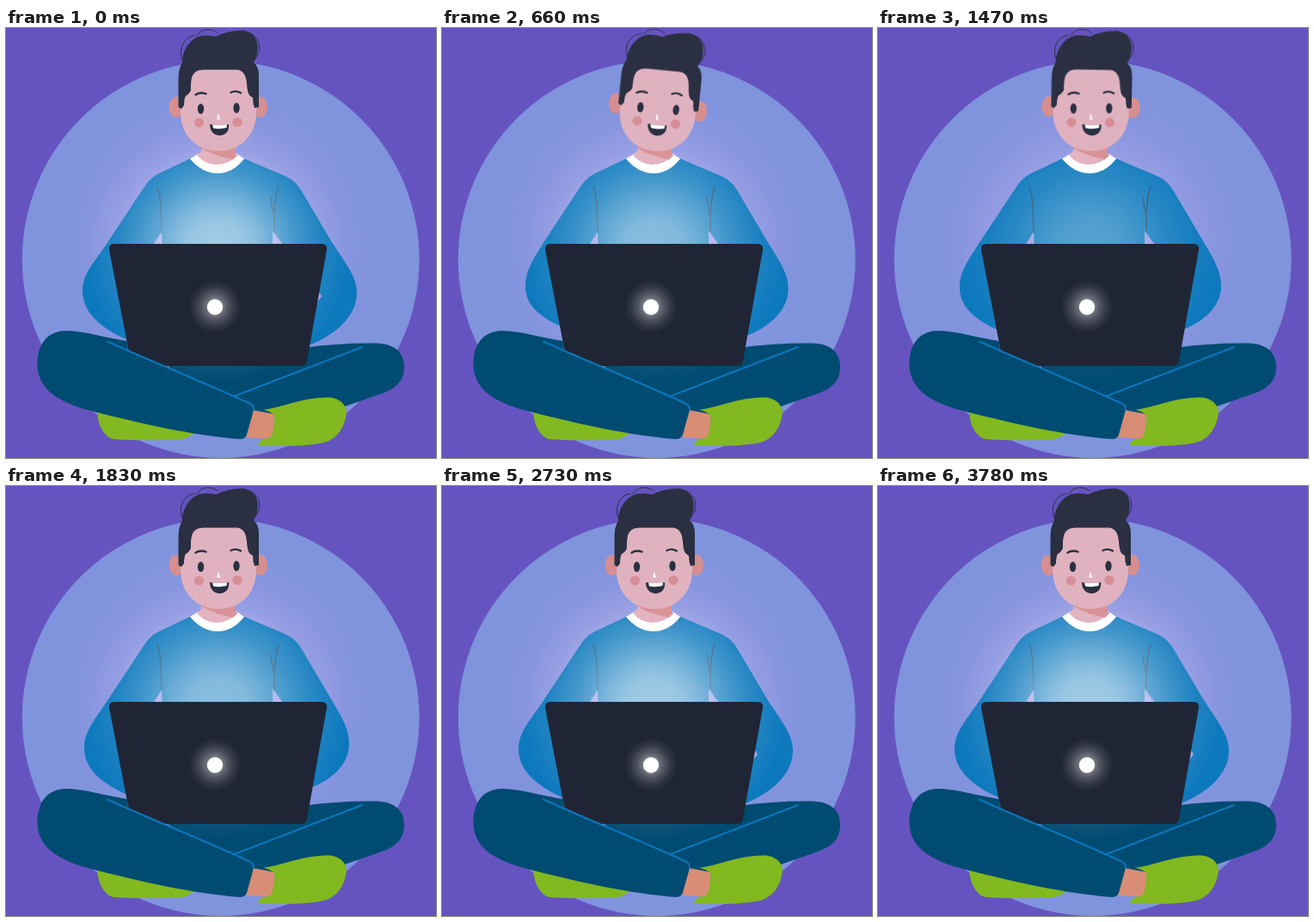
These frames come from a looping animation (500x500 px, 3.84 s). An HTML page:

```html
<!DOCTYPE html>
<html lang="en">
<head>
<meta charset="utf-8">
<title>Working on a laptop</title>
<style>
  html, body { margin: 0; width: 100%; height: 100%; overflow: hidden; background: #6554c0; }
  svg { display: block; width: 100vw; height: 100vh; }

  .anim { animation: 3840ms cubic-bezier(.37, 0, .63, 1) infinite; }
  .head { transform-origin: 247px 136px; animation-name: tilt; }
  .arm-l { animation-name: arm-l; }
  .arm-r { animation-name: arm-r; }
  .gap { animation-name: gap; }
  .glow { animation-name: dim; }

  @keyframes tilt {
    0%, 44.3%, 100% { transform: rotate(0deg); }
    22.1% { transform: rotate(6.4deg); }
  }
  @keyframes arm-l {
    0%, 57%, 100% { d: path("M214 152L178 169C168 174 164 180 158 189L119 248C104 271 89 285 89 306C89 328 106 347 140 362L160 362L160 270L181 237L192 200Z"); }
    18%, 28.6% { d: path("M214 152L178 169C168 174 164 180 158 189L119 248C108 266 97 281 97 300C97 320 110 333 134 345L160 354L160 270L181 237L192 200Z"); }
  }
  @keyframes arm-r {
    0%, 68%, 100% { d: path("M277 152L322 171C333 176 338 180 344 190L377 246C394 273 408 288 408 308C408 332 388 354 355 368L335 367L335 270L311 237L302 200Z"); }
    31%, 47% { d: path("M277 152L322 171C333 176 338 180 344 190L377 246C390 268 399 282 399 300C399 320 384 338 359 349L335 358L335 270L311 237L302 200Z"); }
  }
  @keyframes gap {
    0%, 68%, 100% { opacity: 1; }
    12%, 60% { opacity: 0; }
  }
  @keyframes dim {
    0%, 10%, 56%, 100% { opacity: 1; }
    31% { opacity: .36; }
  }
</style>
</head>
<body>
<svg viewBox="0 0 500 500">
  <defs>
    <radialGradient id="aura">
      <stop offset="0" stop-color="#aaa0ec" stop-opacity=".8"/>
      <stop offset=".5" stop-color="#a69eea" stop-opacity=".5"/>
      <stop offset=".75" stop-color="#a09be6" stop-opacity=".25"/>
      <stop offset="1" stop-color="#8f98e0" stop-opacity="0"/>
    </radialGradient>
    <radialGradient id="screen">
      <stop offset="0" stop-color="#fff" stop-opacity=".63"/>
      <stop offset=".23" stop-color="#fff" stop-opacity=".58"/>
      <stop offset=".35" stop-color="#fff" stop-opacity=".48"/>
      <stop offset=".47" stop-color="#fff" stop-opacity=".36"/>
      <stop offset=".6" stop-color="#fff" stop-opacity=".23"/>
      <stop offset=".8" stop-color="#fff" stop-opacity=".08"/>
      <stop offset="1" stop-color="#fff" stop-opacity="0"/>
    </radialGradient>
    <radialGradient id="halo">
      <stop offset=".2" stop-color="#fff" stop-opacity=".45"/>
      <stop offset=".5" stop-color="#fff" stop-opacity=".22"/>
      <stop offset=".75" stop-color="#fff" stop-opacity=".08"/>
      <stop offset="1" stop-color="#fff" stop-opacity="0"/>
    </radialGradient>
  </defs>

  <rect width="500" height="500" fill="#6554c0"/>
  <circle cx="249.7" cy="269" r="230.9" fill="#8093dd"/>
  <circle cx="246" cy="250" r="192" fill="url(#aura)"/>

  <!-- sweater -->
  <g fill="#0d79bd">
    <path d="M214 152Q246 172 277 152L320 172Q318 205 310 238V262H182L181 238Q180 205 178 172Z"/>
    <path class="anim arm-l" d="M214 152L178 169C168 174 164 180 158 189L119 248C104 271 89 285 89 306C89 328 106 347 140 362L160 362L160 270L181 237L192 200Z"/>
    <path class="anim arm-r" d="M277 152L322 171C333 176 338 180 344 190L377 246C394 273 408 288 408 308C408 332 388 354 355 368L335 367L335 270L311 237L302 200Z"/>
  </g>
  <path class="anim gap" d="M362 304L367 312L360 321Z" fill="#9b9fe4"/>
  <g fill="none" stroke="#1f5a80" stroke-width="1.8" stroke-linecap="round">
    <path d="M176 185C181 198 180 216 181 237M317 185C312 198 312 216 312 237M308 197Q309 208 312 217"/>
  </g>

  <!-- back leg and feet -->
  <path d="M106 446C107 462 113 474 124 478C145 480 175 479 198 479Q213 478 222 468Z" fill="#82b820"/>
  <path d="M180 385L345 372Q385 366 430 366.500C453 367 463 378 463 394C463 409 455 418 440 424L394 440L300 455L240 440Z" fill="#004b71"/>
  <path d="M262 429.500L414 371" fill="none" stroke="#0a76bc" stroke-width="2" stroke-linecap="round"/>

  <g class="anim glow"><circle cx="246" cy="260" r="154" fill="url(#screen)"/></g>

  <!-- neck and collar -->
  <path d="M214 152L224 146Q246 154 268 146L277 152Q264 169 246 169Q228 169 214 152Z" fill="#fff"/>
  <path d="M227 134H267V146L269 148Q258 159 245 159Q232 159 222 148L227 143Z" fill="#e3b3c0"/>
  <path d="M227 134H267V146L269 148L264 153Q243 149 227 140Z" fill="#d99396"/>

  <g class="anim head">
    <g fill="#d68e90">
      <ellipse cx="198" cy="92" rx="8.500" ry="12"/>
      <ellipse cx="296" cy="92" rx="8" ry="12"/>
    </g>
    <path d="M203 60Q203 42 247 42Q291 42 291 60V98C291 126 271 143 247 143C223 143 203 126 203 98Z" fill="#e0b2c0"/>
    <g fill="#2a3041">
      <path d="M200.500 92V62Q200 48 205 40C205 28 212 13 227 9Q237 8 244 10C260 2 279 1 287 8C295 16 294 29 288 40Q294 45 294 55V92L289 93Q287 88 287 81C281 78 281 74 280 65Q279 49 268 48.500H230C216 49 215 57 215 72Q214 76 209 79Q207 82 207 90L204 94Z"/>
      <ellipse cx="226.500" cy="94" rx="3.700" ry="6"/>
      <ellipse cx="268" cy="93" rx="3.700" ry="6"/>
    </g>
    <g fill="none" stroke="#2a3041" stroke-linecap="round">
      <path d="M220.500 77.500Q226 74 232.500 76.500M261.500 75Q267 72 273 75.500" stroke-width="2.400"/>
      <path d="M205 37C200 24 207 10 219 9M222 9C226 1 239 -1 246 6M272 3C290 3 303 20 289 37" stroke-width="1"/>
    </g>
    <circle cx="224.500" cy="110" r="5.600" fill="#d68e96"/>
    <circle cx="269" cy="109.500" r="5.600" fill="#d68e96"/>
    <path d="M246.500 99L249 106.500H245.500Z" fill="#fff"/>
    <path d="M237 112Q248 114 259 112C260 120 255 125 248.500 125C242 125 237 120 237 112Z" fill="#2a3041"/>
    <path d="M240 112.500Q248 113.500 257 112.300L256.500 116Q249 118 241 116.500Z" fill="#fff"/>
  </g>

  <!-- laptop -->
  <path d="M126 251H367Q374 251 373 258L350 387Q349 393 343 393H146L120 258Q119 251 126 251Z" fill="#202535"/>
  <circle cx="243" cy="324" r="31" fill="url(#halo)"/>
  <circle cx="243" cy="324.500" r="9.200" fill="#fff"/>

  <!-- front leg -->
  <path d="M286 444L312 449Q313 462 309 478L279 476Z" fill="#d98d76"/>
  <path d="M299 444C322 441 344 430 372 429.500C386 429 396 437 396 447C394 466 384 478 370 482C346 487 318 486 293 486Q294 479 300 478Q309 478 310 470Q313 459 312 450Q306 445 299 444Z" fill="#82b820"/>
  <path d="M36.500 392C36 368 48 352 70 352C92 352 118 361 141 364L142 375L282 435Q289 438 288 444L280 473Q278 478 272 478C218 474 158 460 106 447C64 437 37 422 36.500 392Z" fill="#004b71"/>
  <path d="M118 364.500C165 386 230 412 282 436Q288 438 288 444" fill="none" stroke="#0a76bc" stroke-width="2" stroke-linecap="round"/>
</svg>
</body>
</html>
```
